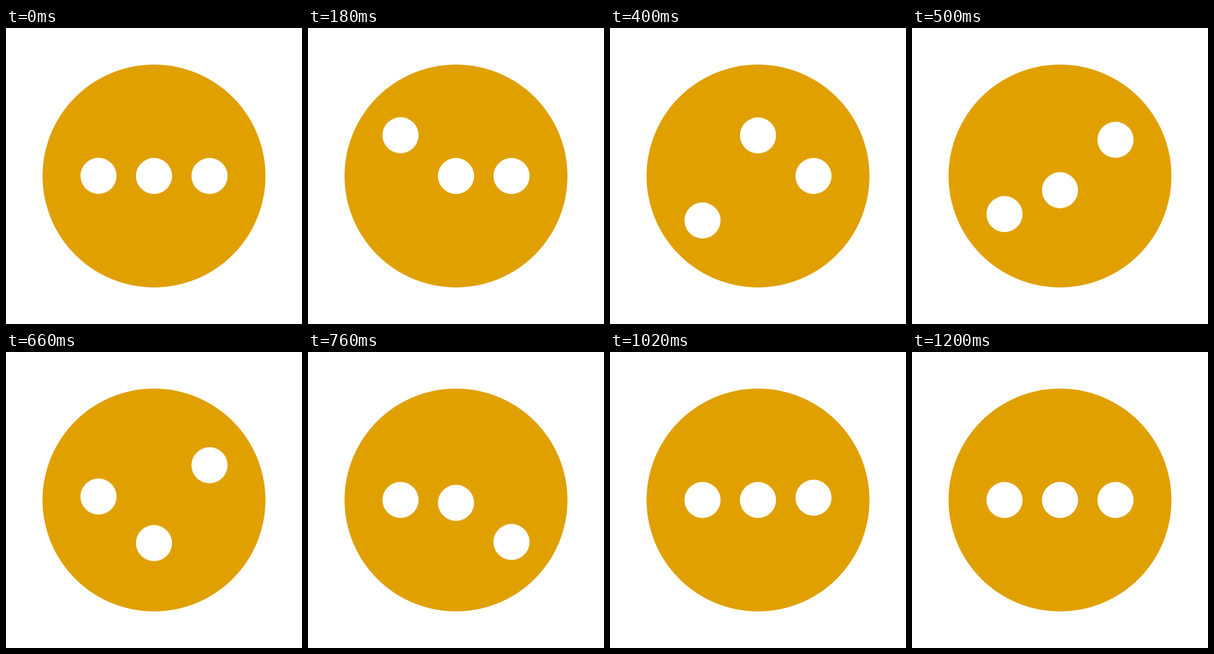
An HTML page for the animation above (1.22 s loop, 512 by 512 pixels).

```html
<!DOCTYPE html>
<html lang="en">
<head>
<meta charset="utf-8">
<title>Bouncing dots</title>
<style>
  html, body { margin: 0; width: 100%; height: 100%; overflow: hidden; background: #fff; }
  svg { display: block; width: 100vw; height: 100vh; }
  .disc { fill: #e0a000; }
  .dot { fill: #fff; animation: hop 1220ms infinite; }
  .a { animation-delay: -8ms; }
  .b { animation-delay: 199ms; }
  .c { animation-delay: 408ms; }

  /* up, short rest, drop below, small overshoot, settle */
  @keyframes hop {
    0%      { transform: translateY(0);       animation-timing-function: cubic-bezier(.5, 0, 0, 1); }
    13.93%  { transform: translateY(-70.5px); animation-timing-function: linear; }
    15.57%  { transform: translateY(-70.5px); animation-timing-function: cubic-bezier(.85, 0, .2, 1); }
    32.38%  { transform: translateY(77px);    animation-timing-function: cubic-bezier(.95, 0, .05, 1); }
    55.33%  { transform: translateY(-6px);    animation-timing-function: cubic-bezier(.8, 0, .2, 1); }
    64.75%, 100% { transform: translateY(0); }
  }
</style>
</head>
<body>
<svg viewBox="0 0 512 512">
  <circle class="disc" cx="256" cy="256" r="192.8"/>
  <circle class="dot a" cx="160" cy="256" r="31.25"/>
  <circle class="dot b" cx="256" cy="256" r="31.25"/>
  <circle class="dot c" cx="352" cy="256" r="31.25"/>
</svg>
</body>
</html>
```
